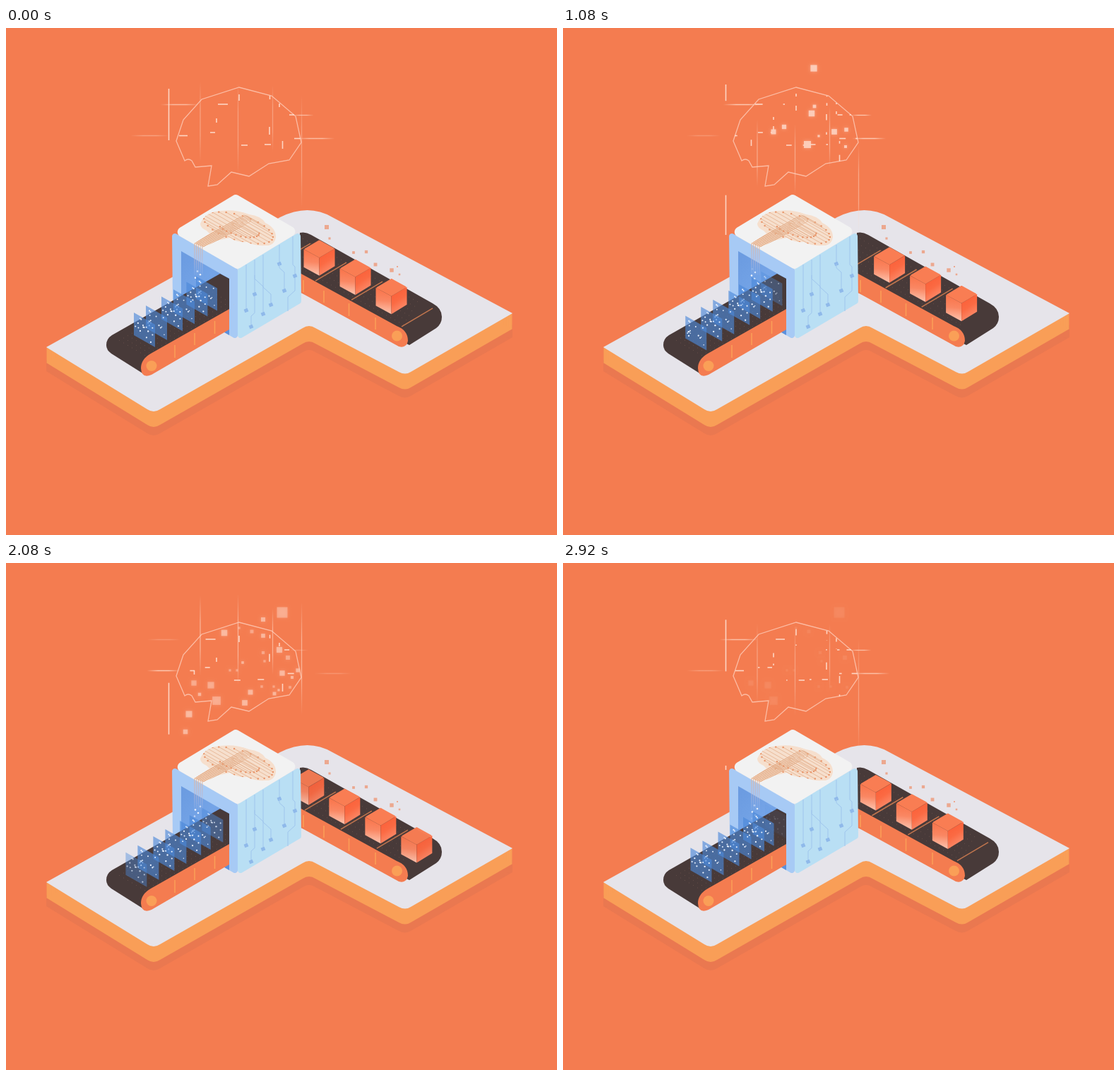
An HTML page with a canvas for the animation above (2.96 s loop, 780 by 718 pixels).

```html
<!DOCTYPE html>
<html lang="en">
<head>
<meta charset="utf-8">
<title>Data machine</title>
<style>
html, body { margin: 0; width: 100%; height: 100%; overflow: hidden; background: #f47c50; }
canvas { display: block; width: 780px; height: 718px; }
</style>
</head>
<body>
<canvas id="stage" width="780" height="718"></canvas>
<script>
const g = document.getElementById('stage').getContext('2d');
const LOOP = 2960, STEP = 40, TAU = Math.PI * 2;
const DARK = '#483a39', ORANGE = '#f47c50', AMBER = '#fa9f57';
const clamp = v => Math.max(0, Math.min(1, v));

function random(seed) {
  return () => (seed = (seed * 16807) % 2147483647) / 2147483647;
}

// Closed polygon from flat coordinates, with an optional corner radius.
function poly(pts, fill, r = 0) {
  const n = pts.length / 2;
  const at = i => [pts[(i % n) * 2], pts[(i % n) * 2 + 1]];
  const [ax, ay] = at(n - 1), [bx, by] = at(0);
  g.beginPath();
  g.moveTo((ax + bx) / 2, (ay + by) / 2);
  for (let i = 0; i < n; i++) g.arcTo(...at(i), ...at(i + 1), r);
  g.closePath();
  g.fillStyle = fill;
  g.fill();
}

function path(d, color, width = 1) {
  g.strokeStyle = color;
  g.lineWidth = width;
  g.stroke(new Path2D(d));
}

function shape(d, fill) {
  g.fillStyle = fill;
  g.fill(new Path2D(d));
}

function dot(x, y, r, fill) {
  g.beginPath();
  g.arc(x, y, r, 0, TAU);
  g.fillStyle = fill;
  g.fill();
}

function square(x, y, s, fill) {
  g.fillStyle = fill;
  g.fillRect(x - s / 2, y - s / 2, s, s);
}

// Squares listed from large to small.
function squares(list, max, min, power, fill) {
  const n = list.length / 2;
  for (let i = 0; i < n; i++) {
    const q = n > 1 ? i / (n - 1) : 0;
    square(list[i * 2], list[i * 2 + 1], min + (max - min) * (1 - q) ** power, fill);
  }
}

function fade(x0, y0, x1, y1, ...colors) {
  const f = g.createLinearGradient(x0, y0, x1, y1);
  colors.forEach((c, i) => f.addColorStop(i / (colors.length - 1), c));
  return f;
}

function clipRect(x, y, w, h, draw) {
  g.save();
  g.beginPath();
  g.rect(x, y, w, h);
  g.clip();
  draw();
  g.restore();
}

// One slab outline serves the top, the rim and the shadow.
const SLAB = new Path2D('M57 452L388 268Q428 248 462 268L717 404L573 487Q565 492 556 487L438 425Q429 419 420 425L218 540Q209 546 200 540Z');

function platform() {
  const layer = (from, to, fill) => {
    g.fillStyle = fill;
    for (let dy = from; dy <= to; dy++) {
      g.save();
      g.translate(0, dy);
      g.fill(SLAB);
      g.restore();
    }
  };
  layer(34, 34, '#ea7850');
  shape('M57 470V486L75 490ZM717 420V438L700 440Z', '#ea7850');
  layer(1, 22, '#f99e57');
  layer(0, 0, '#e6e4ea');
  squares([454, 282, 546, 343, 523, 335, 510, 317, 492, 318, 458, 298, 557, 349, 554, 338], 6, 2, 1, '#eca88f');
}

// Faint rows of pinpricks on a belt surface.
function pinpricks(x, y, dx, dy, rowX, rowY, count) {
  g.fillStyle = 'rgba(235,170,140,.17)';
  for (let r = 0; r < 7; r++)
    for (let i = 0; i < count; i++)
      g.fillRect(x + dx * i + rowX * r, y + dy * i + rowY * r, 1, 1);
}

function cube(x, y, alpha) {
  g.save();
  g.globalAlpha = alpha;
  g.translate(x, y);
  poly([-22, -12, 0, 0, 0, 25.5, -22, 13.5], fade(0, -10, -3, 24, '#f9744a', '#fa8763', '#fdc0aa'));
  poly([0, 0, 22, -13, 22, 12, 0, 25.5], fade(4, -8, 20, 16, '#fb5f38', '#fb6a43', '#fc8a69'));
  poly([-22, -12, 0, -25, 22, -13, 0, 0], '#f97d53', 1);
  g.restore();
}

function outBelt(t) {
  const shift = 51 * t / LOOP;
  shape('M416 290Q424 288 432 293L604 390Q617 397 617 409Q617 419 609 425L571 449L416 374Z', DARK);
  pinpricks(420, 298, 6, 3.3, -4, 6.5, 28);
  clipRect(416, 270, 210, 190, () => {
    for (let k = -1; k < 3; k++) {
      let x = 438 + 51 * k + shift;
      if (x > 530) x = 530 + (x - 530) * 3;
      if (x < 570) path(`M${x} ${347 + (x - 417) * .53}l44 -26`, 'rgba(246,143,88,.7)', 1.5);
    }
    shape('M416 347L553 422Q569 428 569 443Q567 454 556 451L416 374Z', ORANGE);
    dot(553.5, 436, 7.5, AMBER);
    path('M421 357v17M450 372v17M485.500 390v18M523 410v17', AMBER, 1.5);
    for (let k = -1; k < 3; k++) {
      const x = 443.5 + 51 * k + shift;
      const alpha = Math.min(clamp((x - 418) / 11), clamp((593 - x) / 12));
      cube(x, 325 + (x - 443) * .535, alpha);
    }
  });
}

function chip() {
  const brain = 'M267 305L288 291L284 287Q275 283 275 277Q281 263 296 260Q322 255 344 264Q361 266 367 276Q382 283 382 296Q380 309 367 308Q352 309 341 303Q327 304 317 297L299 301L280 310Z';
  shape(brain, '#f6dfcd');
  g.save();
  g.clip(new Path2D(brain));
  for (let i = 0; i < 38; i++) {
    const angle = i * TAU / 26, ring = i < 26 ? 1 : .6;
    const c = Math.cos(angle) * ring, s = Math.sin(angle) * ring;
    const ex = 329 + 49 * c, ey = 283 + 18.5 * s + 13 * c;
    const x = 277 + i % 7 * 2.2, y = 299 + i % 7 * 1.1;
    const a = ((ex - x) - (ey - y) / .57) / 2;
    path(`M${x - 12} ${y + 7}L${x} ${y}l${a} ${-a * .57}L${ex} ${ey}`, '#e5b18e', .8);
    dot(ex, ey, 1.25, '#e8966b');
  }
  g.restore();
}

// Circuit on the right face: end point, rise, sideways kink, top.
const CIRCUIT = [
  [340, 400, 20, 0, 335], [364, 405, 39, -12, 328], [347, 423, 15, 5, 377], [375, 392, 15, -11, 321],
  [387, 334, 10, 0, 307], [394, 372, 26, -7, 334], [409, 351, 13, -3, 295], [352, 377, 10, 0, 350]
];

function box() {
  poly([235, 288, 328, 341, 328, 442, 236, 388], '#a7caf5', 4);
  poly([328, 341, 417, 288, 418, 389, 328, 442], '#b9dff4', 4);
  poly([236, 289, 325, 235, 416, 288, 328, 342], '#f2f2f2', 7);
  poly([248, 316, 316, 355, 316, 435, 248, 396], fade(248, 330, 316, 390, '#6c9ce1', '#74a4e7', '#5c90dc'));
  path('M399 401V381L409 372V350', '#9fc5ed');
  for (const [x, y, rise, kink, top] of CIRCUIT) {
    path(`M${x} ${y}v${-rise}l${kink} ${-Math.abs(kink) * .9}V${top}`, '#9fc5ed');
    path(`M${x - 2.5} ${y + 1}l5 -2`, '#8fb9ea', 5);
  }
  chip();
  const flow = fade(0, 303, 0, 350, '#e6b796', 'rgba(190,180,200,.75)', 'rgba(190,200,235,.1)');
  for (let i = 0; i < 5; i++) path(`M${267 + i * 2.7} ${305 + i}V350`, flow, 1.2);
}

function panel(x, id) {
  const y = 403 - (x - 181) * .585, rnd = random(id * 977 + 31);
  g.globalAlpha = Math.min(clamp((x - 162) / 11), clamp((288 - x) / 14));
  poly([x, y, x + 30, y + 17, x + 30, y + 49, x, y + 32], 'rgba(76,137,217,.64)');
  for (let i = 0; i < 15; i++) {
    const u = 2 + rnd() * 26, v = 3 + rnd() * 26;
    dot(x + u, y + u * .57 + v, .7 + rnd() * .5, '#eaf2ff');
  }
  g.globalAlpha = 1;
}

function inBelt(t) {
  shape('M316 355L303 348L150 435Q142 440 142 449Q142 456 149 461L195 490L316 420Z', DARK);
  pinpricks(160, 442, 6, -3.42, 6, 3.5, 22);
  shape('M316 398L205 461Q191 469 191 482Q192 497 206 491L316 427Z', ORANGE);
  dot(206, 478.5, 7.5, AMBER);
  path('M239 449v18M267 432v17M295.500 415v18', AMBER, 1.5);

  for (let i = 0; i < 5; i++) {
    const p = (t / LOOP * 4 + i / 5) % 1;
    g.globalAlpha = Math.sin(p * Math.PI);
    dot(267 + (i * 4) % 11, 340 + p * 23, 1.3, '#f4f8ff');
  }
  g.globalAlpha = 1;

  clipRect(140, 300, 176, 180, () => {
    for (let k = 2; k >= -1; k--)
      for (const off of [17, 0]) {
        const u = 39 * k + off + 39 * t / LOOP;
        panel(181 + (u < 60 ? u : 60 + (u - 60) * .8), off + 1);
      }
  });
}

const OUTLINE = 'M241 160L251 130L277 101L330 84L376 96L410 125L418 162L401 187L372 192L344 210L319 204L299 222L286 224L291 195L268 197L263 188Q258 184 253 188Z';

function segment(vertical, at, from, to, color, width) {
  if (to <= from) return;
  path(vertical ? `M${at} ${from}V${to}` : `M${from} ${at}H${to}`, color, width);
}

// A dash that travels through its window [lo, hi] and wraps.
function dash(vertical, p, at, start, len, travel, lo, hi) {
  for (const wrap of [0, 1]) {
    const s = start + travel * (p - wrap);
    segment(vertical, at, Math.max(s, lo), Math.min(s + len, hi), 'rgba(255,226,211,.88)', 1.6);
  }
}

function dashes(p) {
  const across = (...d) => dash(false, p, ...d), down = (...d) => dash(true, p, ...d);
  across(108, 300, 14, -43, 272, 314);
  across(123, 401, 7, -17, 388, 408);
  across(148, 289, 7, -18, 276, 296);
  across(166, 333, 9, -25, 316, 342);
  across(165, 366, 9, -24, 349, 375);
  across(156.5, 408, 9, -23, 391, 417);
  down(230.5, 86, 73, 206.5, 80, 293);
  down(330, 94, 9, 22, 93, 117);
  down(298, 128, 6, 15, 126, 145);
  down(391.5, 160, 11, 27, 160, 189);
  down(373.5, 96, 5, 14, 96, 110);
  down(387, 107, 5, 15, 106, 122);
  down(373, 140, 11, -28, 122, 151);
  // These two share a path that turns a corner.
  across(152.5, 245, 12, 38, 243, 267);
  down(266.5, 130.5, 12, 38, 152, 167);
}

// A soft line with faded ends, cut to its window.
function beam(vertical, at, mid, len, lo, hi, alpha) {
  const a = Math.max(mid - len / 2, lo), b = Math.min(mid + len / 2, hi);
  const ends = vertical ? [0, a, 0, b] : [a, 0, b, 0];
  const edge = 'rgba(255,214,195,0)', core = `rgba(255,214,195,${alpha})`;
  segment(vertical, at, a, b, fade(...ends, edge, core, core, edge), 1.3);
}

function beams(p) {
  const swing = Math.cos(TAU * (p - .25)), slide = Math.cos(TAU * (p - .32));
  const glow = .5 + .1 * Math.cos(TAU * (p - .45));
  const lit = .55 + .33 * slide, dim = .55 - .33 * slide;
  beam(true, 275, 133 - 54 * swing, 114, 34, 225, glow);
  beam(true, 328.5, 142 - 59 * swing, 130, 34, 236, glow);
  beam(true, 377.5, 128 - 30 * swing, 94, 55, 198, glow);
  beam(true, 418.5, 175 - 71 * swing, 160, 50, 290, glow);
  beam(false, 152.5, 211 + 18 * slide, 54, 175, 246, lit);
  beam(false, 108.5, 237 - 20 * slide, 54, 200, 283, dim);
  beam(false, 123.5, 418 - 6 * slide, 30, 402, 437, dim);
  beam(false, 156.5, 447 + 20 * slide, 54, 409, 489, dim);
}

// Squares that fade in from a to b and out from c to d.
function flicker(t, [a, b, c, d], max, power, list) {
  const alpha = Math.min(clamp((t - a) / (b - a)), clamp((d - t) / (d - c)));
  if (!alpha) return;
  g.save();
  g.globalAlpha = alpha * .88;
  g.shadowColor = 'rgba(255,200,180,.6)';
  g.shadowBlur = 5;
  squares(list, max, 3.2, power, '#fdd3c2');
  g.restore();
}

function thought(t) {
  const p = t / (LOOP / 2) % 1;
  beams(p);
  path(OUTLINE, 'rgba(255,214,197,.72)', 1.3);
  dashes(p);
  flicker(t, [100, 350, 480, 840], 18, 1, [330, 125]);
  flicker(t, [100, 450, 620, 1000], 10, 1, [326, 188, 350, 134, 280, 119, 344, 152, 278, 134,
    353, 194, 373, 153, 323, 109, 411, 136, 335, 176]);
  flicker(t, [590, 960, 1150, 1550], 10, 1, [346, 165, 355, 57, 352, 121, 384, 147, 298, 147,
    313, 140, 401, 144, 356, 111, 400, 168, 362, 153]);
  flicker(t, [1300, 1600, 1950, 2380], 9, 1, [259, 214, 309, 99, 387, 123, 338, 198, 391, 156,
    346, 183, 254, 239, 364, 80, 364, 103, 413, 152, 380, 185, 274, 186, 405, 162, 335, 141, 386, 180]);
  flicker(t, [1850, 2300, 2500, 2970], 15, 4, [391, 70, 298, 195, 290, 173, 266, 170, 399, 134,
    348, 97, 364, 127, 402, 176, 362, 175, 366, 139, 330, 92, 327, 152, 317, 152, 379, 175]);
}

function draw(t) {
  g.fillStyle = ORANGE;
  g.fillRect(0, 0, 780, 718);
  platform();
  outBelt(t);
  box();
  inBelt(t);
  thought(t);
}

const start = performance.now();
function tick() {
  const t = (performance.now() - start) % LOOP;
  draw(Math.floor(t / STEP) * STEP);
  requestAnimationFrame(tick);
}
tick();
</script>
</body>
</html>
```
